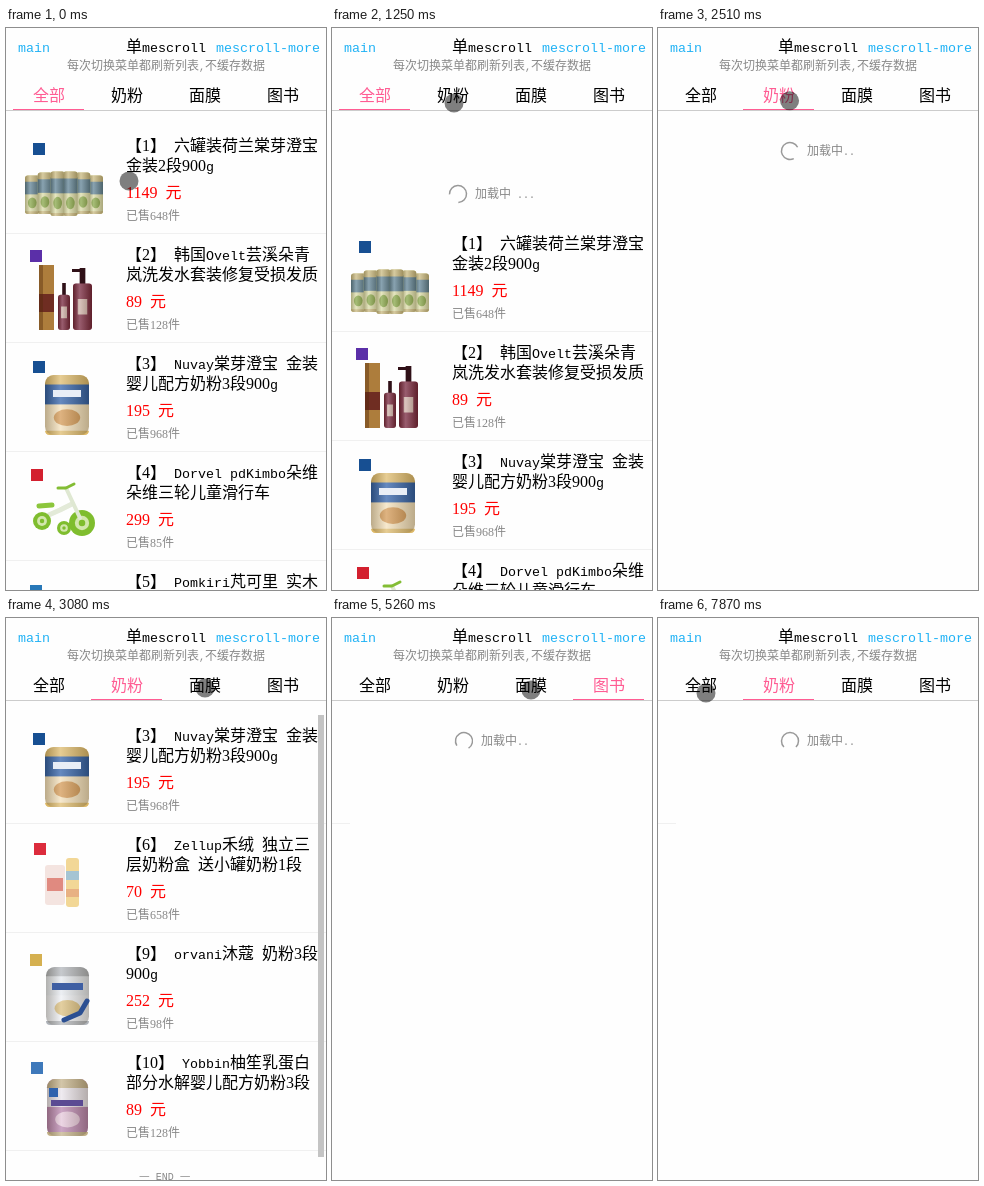
An HTML page with a canvas that plays this animation: 320 by 562 pixels, repeating every 8000 ms.

```html
<!DOCTYPE html>
<html lang="zh-CN">
<head>
<meta charset="utf-8">
<title>mescroll</title>
<style>
  html, body { margin: 0; width: 100%; height: 100%; overflow: hidden; background: #fefefe; }
  canvas { display: block; }
</style>
</head>
<body>
<canvas id="stage" width="320" height="562"></canvas>
<script>
const ctx = document.getElementById('stage').getContext('2d');
const LOOP = 8000, LIST_TOP = 97, ROW = 109;
const GRAY = '#888', BLUE = '#20b2f5', PINK = '#ff5c93', DIVIDER = '#f0f0f0';

// ---------- drawing helpers ----------
function rect(x, y, w, h, color) {
  ctx.fillStyle = color;
  ctx.fillRect(x, y, w, h);
}

function round(x, y, w, h, r, color) {
  ctx.fillStyle = color;
  ctx.beginPath();
  ctx.roundRect(x, y, w, h, r);
  ctx.fill();
}

function ellipse(x, y, rx, ry, color) {
  ctx.fillStyle = color;
  ctx.beginPath();
  ctx.ellipse(x, y, rx, ry, 0, 0, Math.PI * 2);
  ctx.fill();
}

function stroke(points, width, color) {
  ctx.strokeStyle = color;
  ctx.lineWidth = width;
  ctx.lineCap = ctx.lineJoin = 'round';
  ctx.beginPath();
  points.forEach(([x, y]) => ctx.lineTo(x, y));
  ctx.stroke();
}

// Digits and Latin letters are both half as wide as the Chinese characters:
// serif digits are 0.5em, monospaced letters 0.6em at 5/6 size.
function fontFor(run, size) {
  if (/^\d/.test(run)) return `${size}px "Liberation Serif", serif`;
  if (/^[\x20-\x7e]/.test(run)) return `${size * 5 / 6}px "Liberation Mono", monospace`;
  return `${size}px "Noto Sans CJK SC", "Noto Sans CJK JP", sans-serif`;
}

function text(str, x, centerY, size, color) {
  ctx.fillStyle = color;
  for (const run of str.match(/\d+|[\x20-\x2f\x3a-\x7e]+|[^\x20-\x7e]+/g)) {
    ctx.font = fontFor(run, size);
    ctx.fillText(run, x, centerY + size * 0.37);
    x += ctx.measureText(run).width;
  }
}

function spinner(x, y, turns) {
  const start = Math.PI * (0.75 + 2 * turns);
  ctx.strokeStyle = '#999';
  ctx.lineWidth = 1.5;
  ctx.lineCap = 'butt';
  ctx.beginPath();
  ctx.arc(x, y, 8.5, start, start + Math.PI * 1.5);
  ctx.stroke();
}

function logo(x, y, color, side = 12) {
  rect(x, y, side, side, color);
}

// ---------- product pictures, relative to the top of a row ----------
function shade(x, y, w, h) {
  const gradient = ctx.createLinearGradient(x, 0, x + w, 0);
  gradient.addColorStop(0, 'rgba(60, 50, 30, 0.3)');
  gradient.addColorStop(0.35, 'rgba(255, 255, 255, 0.3)');
  gradient.addColorStop(1, 'rgba(60, 50, 30, 0.3)');
  round(x, y, w, h, w / 5, gradient);
}

function can(x, y, w, h, { lid, band, body, accent }) {
  round(x, y, w, h, w / 5, body);
  rect(x, y + h * 0.13, w, h * 0.36, band);
  round(x, y, w, h * 0.16, [w / 5, w / 5, 0, 0], lid);
  ellipse(x + w / 2, y + h * 0.71, w * 0.3, h * 0.14, accent);
  round(x, y + h * 0.93, w, h * 0.07, [0, 0, w / 5, w / 5], lid);
  shade(x, y, w, h);
}

function sixCans() {
  logo(27, 18, '#174f92');
  const colors = { lid: '#c5b477', band: '#557a8e', body: '#dadba4', accent: '#7fa03c' };
  for (const i of [0, 5, 1, 4, 2, 3]) {
    const depth = Math.abs(i - 2.5);
    const h = 46 - depth * 3;
    can(19 + i * 12.7, 90 - h + (depth < 1 ? 1 : -1), 14.5, h, colors);
  }
}

function bottle(x, y, w, h) {
  rect(x + w * 0.35, y, w * 0.3, h * 0.3, '#2f1017');
  round(x, y + h * 0.25, w, h * 0.75, 3, '#6d1730');
  rect(x + w * 0.25, y + h * 0.5, w * 0.5, h * 0.25, '#c9a9a0');
  shade(x, y + h * 0.25, w, h * 0.75);
}

function shampoo() {
  logo(24, 16, '#5b2fa8');
  rect(33, 31, 15, 65, '#ad7d3c');
  rect(33, 60, 15, 18, '#6f2d22');
  rect(33, 31, 4, 65, 'rgba(80, 40, 10, 0.4)');
  bottle(52, 49, 12, 47);
  bottle(67, 34, 19, 62);
  rect(66, 35, 11, 3, '#2f1017');
}

function goldCan() {
  logo(27, 18, '#174f92');
  can(39, 32, 44, 60, { lid: '#dcb765', band: '#2457a4', body: '#f3dfb8', accent: '#d0924a' });
  rect(47, 47, 28, 7, '#e9eef6');
}

function wheel(x, y, r) {
  ellipse(x, y, r, r, '#7fbd2e');
  ellipse(x, y, r * 0.55, r * 0.55, '#d3e7ad');
  ellipse(x, y, r * 0.25, r * 0.25, '#7fbd2e');
}

function tricycle() {
  logo(25, 17, '#d3202f');
  stroke([[36, 66], [54, 58], [66, 52]], 5, '#e3ead8');
  wheel(36, 69, 9);
  wheel(58, 76, 7);
  wheel(76, 71, 13);
  stroke([[74, 66], [60, 36]], 4, '#dfe8d2');
  stroke([[52, 36], [60, 36], [68, 32]], 3, '#83bd34');
  stroke([[33, 54], [46, 53]], 5, '#8cc63c');
}

function crib() {
  logo(24, 24, '#2878b8');
}

function milkBoxes() {
  logo(28, 19, '#dc2c3c');
  round(39, 41, 20, 40, 3, '#f4e4e0');
  rect(41, 54, 16, 13, '#e08a80');
  round(60, 34, 13, 49, 3, '#f2d796');
  rect(60, 47, 13, 9, '#a5c4d3');
  rect(60, 65, 13, 8, '#e8b183');
}

function silverCan() {
  logo(24, 21, '#d5b050');
  can(40, 34, 43, 58, { lid: '#aeb2b8', band: '#e4e8ee', body: '#eceef3', accent: '#d8bb78' });
  rect(46, 50, 31, 7, '#3f5fa3');
  stroke([[81, 68], [74, 80], [58, 87]], 5, '#2b4f92');
}

function lilacCan() {
  logo(25, 20, '#3e79bb');
  can(41, 37, 41, 57, { lid: '#c0ad84', band: '#e8e2ea', body: '#b57fab', accent: '#e3c3d8' });
  rect(43, 46, 9, 9, '#2f62ad');
  rect(45, 58, 32, 6, '#5b4a93');
}

function maskBox() {
  logo(26, 18, '#5b2fa8');
  rect(36, 32, 46, 62, '#dfeaf0');
  ellipse(59, 62, 15, 20, '#f8fafb');
}

// ---------- data ----------
const product = (no, title, second, price, sold, picture) =>
  ({ title: `【${no}】 ${title}`, second, price, sold, picture });

const goldMilk = product(3, 'Nuvay棠芽澄宝 金装', '婴儿配方奶粉3段900g', 195, 968, goldCan);

const tabs = [
  { name: '全部', rows: [
    product(1, '六罐装荷兰棠芽澄宝', '金装2段900g', 1149, 648, sixCans),
    product(2, '韩国Ovelt芸溪朵青', '岚洗发水套装修复受损发质', 89, 128, shampoo),
    goldMilk,
    product(4, 'Dorvel pdKimbo朵维', '朵维三轮儿童滑行车', 299, 85, tricycle),
    product(5, 'Pomkiri芃可里 实木', '婴儿床', 1299, 56, crib),
  ] },
  { name: '奶粉', ended: true, rows: [
    goldMilk,
    product(6, 'Zellup禾绒 独立三', '层奶粉盒 送小罐奶粉1段', 70, 658, milkBoxes),
    product(9, 'orvani沐蔻 奶粉3段', '900g', 252, 98, silverCan),
    product(10, 'Yobbin柚笙乳蛋白', '部分水解婴儿配方奶粉3段', 89, 128, lilacCan),
  ] },
  { name: '面膜', rows: [
    product(7, '补水保湿蚕丝面膜', '十片装', 99, 128, maskBox),
  ] },
  { name: '图书', rows: [] },
];

// Tab opened at a time, and when its data has arrived.
const visits = [
  { at: 0, tab: 0, ready: 0 },
  { at: 2110, tab: 1, ready: 3080 },
  { at: 3350, tab: 2, ready: 4290 },
  { at: 4720, tab: 3, ready: 5650 },
  { at: 6040, tab: 2, ready: 7090 },
  { at: 7350, tab: 1, ready: Infinity },
];

const pointerPath = [
  [310, 123, 153], [580, 110, 277], [730, 110, 277], [1250, 122, 75], [1830, 128, 73],
  [2450, 128, 73], [2900, 199, 70], [3600, 199, 70], [4100, 277, 72],
  [4850, 277, 72], [5200, 199, 72], [6200, 199, 72], [6600, 121, 74],
  [7450, 121, 74], [7800, 48, 75],
];

// ---------- motion ----------
const progress = (t, from, to) => Math.min(1, Math.max(0, (t - from) / (to - from)));
const easeOut = p => 1 - (1 - p) ** 3;

function pointerAt(t) {
  const next = pointerPath.findIndex(([time]) => time > t);
  if (next === 0) return pointerPath[0].slice(1);
  if (next < 0) return pointerPath.at(-1).slice(1);
  const [t0, x0, y0] = pointerPath[next - 1], [t1, x1, y1] = pointerPath[next];
  const p = progress(t, t0, t1), eased = p * p * (3 - 2 * p);
  return [x0 + (x1 - x0) * eased, y0 + (y1 - y0) * eased];
}

const pullAt = t => 98 * progress(t, 310, 580) * (1 - easeOut(progress(t, 1500, 1830)));

// ---------- scene ----------
function drawRow(row, y) {
  ctx.save();
  ctx.translate(0, y);
  row.picture();
  text(row.title, 120, 20, 16, '#000');
  text(row.second, 120, 40, 16, '#000');
  text(row.price + ' 元', 120, 67, 16, '#f00');
  text(`已售${row.sold}件`, 120, 91, 12, GRAY);
  rect(0, ROW - 1, 320, 1, DIVIDER);
  ctx.restore();
}

function drawEmpty() {
  ellipse(160, 308, 91, 9, '#f4f4f4');
  round(115, 225, 90, 80, 6, '#e9e9e9');
  rect(115, 245, 90, 3, '#dcdcdc');
  text('暂无相关数据~', 121, 339, 12, GRAY);
}

function drawList(tab, pull) {
  tab.rows.forEach((row, i) => drawRow(row, LIST_TOP + pull + i * ROW));
  if (!tab.rows.length) drawEmpty();
  if (tab.ended) {
    text('— END —', 133, 558, 12, GRAY);
    rect(312, LIST_TOP, 6, 442, '#c4c4c4');
  }
}

function drawPull(t, pull) {
  const y = 68 + pull;
  const label = t < 480 ? '下拉刷新' : t < 560 ? '释放更新' : '加载中 ...';
  spinner(126, y, (t - 580) / 600);
  text(label, 143, y, 12, GRAY);
}

function drawHeader(active) {
  rect(0, 0, 320, 83, '#fefefe');
  text('main', 12, 18, 16, BLUE);
  text('单mescroll', 120, 18, 16, '#000');
  text('mescroll-more', 210, 18, 16, BLUE);
  text('每次切换菜单都刷新列表,不缓存数据', 61, 38, 12, GRAY);
  rect(0, 82, 320, 1, '#ccc');
  tabs.forEach((tab, i) => {
    const center = 43 + i * 78;
    text(tab.name, center - 16, 67, 16, tab === active ? PINK : '#000');
    if (tab === active) rect(center - 36, 81, 71, 1, PINK);
  });
}

function draw(t) {
  const index = visits.findLastIndex(v => v.at <= t);
  const visit = visits[index], tab = tabs[visit.tab];
  const pull = pullAt(t);
  rect(0, 0, 320, 562, '#fefefe');

  if (t >= visit.ready) {
    if (pull > 0) drawPull(t, pull);
    drawList(tab, pull);
  } else {
    spinner(132, 123, (t - visit.at - 520) / 600);
    text('加载中..', 149, 123, 12, GRAY);
    // A stub of the single row's divider lingers while the next tab loads.
    if (visits[index - 1].tab === 2) rect(0, LIST_TOP + ROW - 1, 18, 1, DIVIDER);
  }

  drawHeader(tab);
  ellipse(...pointerAt(t), 9.5, 9.5, 'rgba(0, 0, 0, 0.5)');
}

function tick() {
  draw(performance.now() % LOOP);
  requestAnimationFrame(tick);
}
tick();
</script>
</body>
</html>
```
